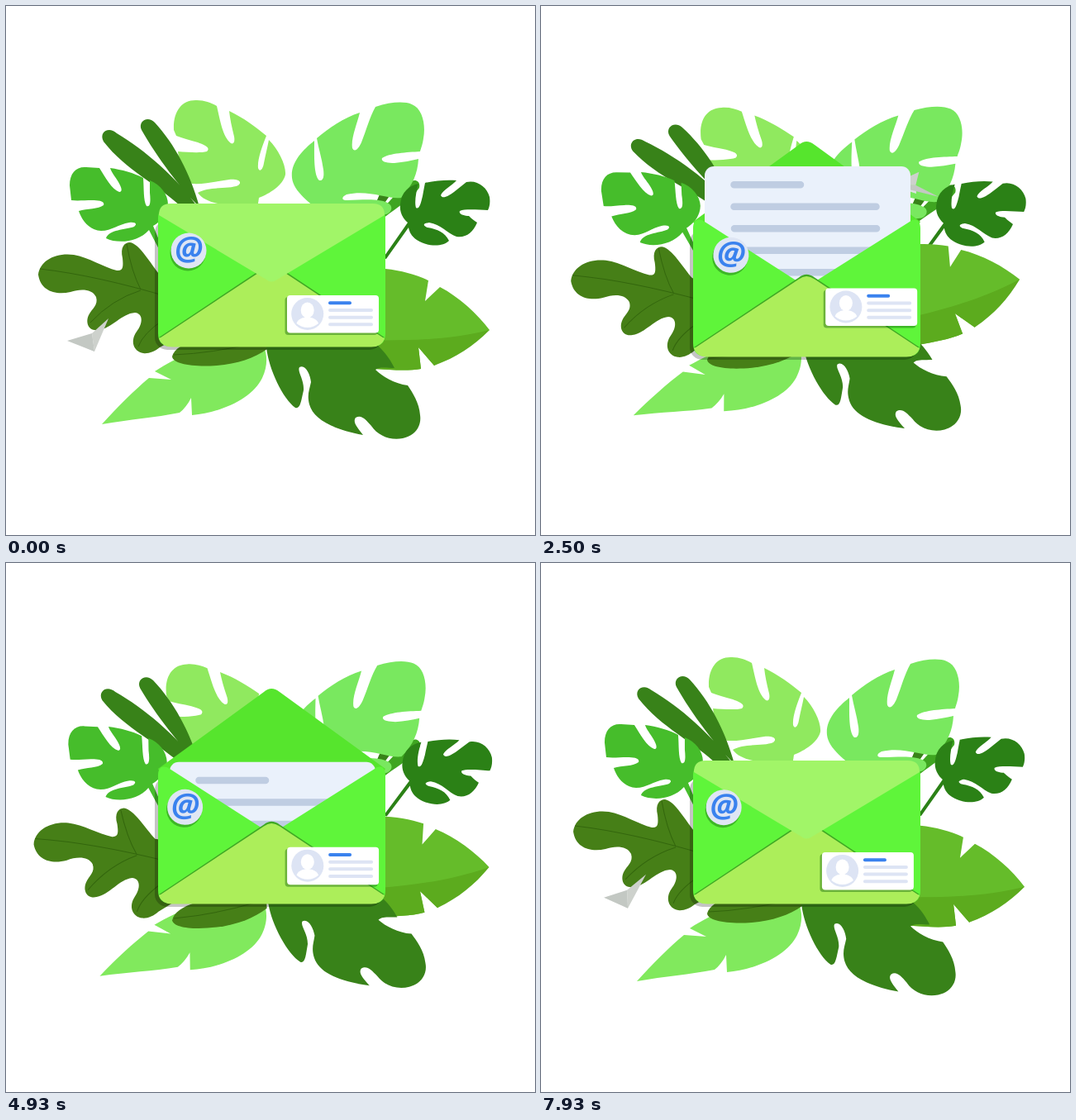
These frames come from a looping animation (640x640 px, 8000 ms). An HTML page:

```html
<!DOCTYPE html>
<html lang="en">
<head>
<meta charset="utf-8">
<title>Mail</title>
<style>
html, body { margin: 0; height: 100%; overflow: hidden; background: #fff; }
svg { display: block; width: 100vw; height: 100vh; }
.vein { fill: none; stroke: #33660d; stroke-width: 1; }
.line { fill: none; stroke-linecap: round; }
.at { font: italic 700 39px "Open Sans", "Noto Sans", sans-serif; fill: #3a82ee; text-anchor: middle; }
</style>
</head>
<body>
<svg viewBox="0 0 640 640">
  <!-- data-p: pivot, data-a: angle at each key time -->
  <g class="leaf" data-p="331 258" data-a="0 2.3 1.2 0 2 2">
    <path fill="#388219" d="M480 199C481 193 475 191 470 197C458 212 448 235 442 255L450 250C462 232 476 215 480 199Z"/>
    <path fill="#3fa521" d="M500 220C502 211 494 208 487 214C470 228 455 245 440 265L450 262C470 245 490 235 500 220Z"/>
    <path fill="#79e85f" d="M346 208C344 190 358 175 373 163C373 180 372 205 379 211C384 212 385 206 384 198C382 184 378 172 376 160C390 148 409 135 428 129C425 142 417 160 419 172C422 178 427 172 430 165C436 150 440 134 447 122C465 116 482 115 491 119C504 124 508 144 505 160C504 168 502 172 501 176C485 177 464 178 455 184C453 189 462 190 470 190C481 189 490 187 499 185C498 203 492 217 478 232C460 234 440 222 412 228C406 231 405 235 413 235C430 235 452 232 463 239C469 243 466 250 460 252L400 262C372 243 348 226 346 208Z"/>
  </g>
  <g class="leaf" data-p="325 261" data-a="0 -7.6 -1.6 -1.6 -7.6 -5">
    <path fill="#90e95f" d="M203 150C202 127 213 113 231 114C240 114 248 117 255 121C259 138 262 158 272 166C276 168 277 163 276 158C273 146 271 136 270 127C287 135 303 147 315 157C310 170 304 185 305 196C307 202 311 197 312 190C314 180 316 172 318 162C330 174 339 193 338 204C335 217 319 227 306 232L304 246H296L297 240C270 243 242 240 232 226C245 218 270 222 281 217C287 212 279 209 270 210C255 212 240 216 225 215C214 203 210 192 208 176C220 177 236 178 243 176C248 171 240 168 232 165C222 162 213 160 206 157Z"/>
  </g>
  <g class="leaf" data-p="238 245" data-a="0 -6.2 -3.2 0 -3 -6">
    <path fill="#388219" d="M118 164C112 153 124 145 134 154C168 174 207 208 234 246L214 245C186 217 145 199 118 164ZM164 150C159 139 172 132 180 141C204 167 223 203 234 243C212 222 182 182 164 150Z"/>
  </g>
  <g class="leaf" data-p="235 312" data-a="0 -3.4 -1.1 0 -2.3 -3.4">
    <path fill="#46bd2b" d="M77 217C77 202 85 194 97 195L113 196C120 207 128 222 137 225C142 225 139 218 136 213C132 206 128 202 126 196C140 198 155 202 166 208C167 220 166 236 170 242C175 244 175 235 174 226V211C187 216 196 228 196 240C195 254 185 262 178 266L192 300H188L173 271C160 286 135 288 121 281C125 270 144 271 155 267C160 263 155 261 149 262C136 264 128 272 115 272C101 271 92 260 88 248C98 245 112 246 118 241C120 236 112 235 104 235C95 235 86 236 79 235Z"/>
  </g>
  <g class="leaf" data-p="372 450" data-a="0 -2.5 0 -1.4 -3.4 -1.4">
    <path fill="#467f17" d="M39 325C41 308 60 298 82 301C100 304 118 316 134 320C142 321 142 315 141 305C138 292 143 286 150 286C162 288 175 312 186 325L210 330V400L186 413C180 418 172 421 166 420C154 418 150 405 158 394C166 384 166 372 156 371C140 372 128 390 112 392C99 394 96 382 100 374C104 366 112 362 109 352C104 342 90 342 78 346C60 350 42 345 39 325Z"/>
    <path class="vein" d="M41 318Q110 326 200 353M146 288Q152 322 163 343M102 383Q128 355 163 344M160 412Q166 396 190 380"/>
  </g>
  <g class="leaf" data-p="310 424" data-a="0 4.2 1.4 .2 3.6 3.3">
    <path fill="#81e95d" d="M116 506C135 485 155 465 173 450L200 452L180 442C195 432 210 425 230 415L312 412C316 422 317 435 310 450C298 475 260 492 225 495L224 474C220 482 215 488 210 492C180 498 150 500 116 506Z"/>
  </g>
  <g class="leaf" data-p="372 425" data-a="0 -2.6 0 -1.5 -3.45 -1.5">
    <path fill="#467f17" d="M201 424C203 415 215 408 230 404H316V415C300 426 280 433 255 435C225 437 202 433 201 424Z"/>
    <path class="vein" d="M203 422Q250 420 300 408"/>
  </g>
  <g class="leaf" data-p="440 330" data-a="0 2.9 -1.3 1.5 1 -2.4">
    <path fill="#2b8116" d="M477 240C478 225 488 217 499 215C496 225 494 238 496 244C500 247 502 238 504 230C505 224 506 219 507 214C520 211 534 210 545 211C540 217 528 223 526 229C528 234 535 230 542 225C547 221 552 217 557 213C570 210 582 219 585 231C586 238 585 243 583 247C573 247 556 245 549 248C547 252 555 254 560 254C564 258 567 260 570 262C565 274 556 281 545 279C534 275 526 264 512 262C504 263 504 266 510 268C522 270 531 274 536 284C528 292 509 291 497 283C490 278 488 273 487 268L460 306L456 305L486 262C479 256 476 248 477 240Z"/>
  </g>
  <g class="leaf" data-p="335 385" data-a="0 -17 -8.2 -.5 -12 -15">
    <path fill="#65bc2a" d="M400 318H459C478 320 496 325 511 332L507 357L525 340C548 352 570 372 585 392L518 435L499 413L502 439C485 442 465 440 446 439L400 420Z"/>
    <path fill="#5cab1e" d="M400 404C459 404 520 408 585 392C565 412 545 425 518 435L499 413L502 439C485 442 465 440 446 439L400 420Z"/>
  </g>
  <g class="leaf" data-p="293 370" data-a="0 -2.9 -3.6 -6.8 0 -7.4">
    <path fill="#388219" d="M315 413C318 440 335 475 350 486C356 488 357 478 360 465C361 452 352 442 355 437C362 433 368 445 369 455C367 465 364 470 367 482C372 500 395 512 432 519C425 510 419 503 423 498C430 494 435 500 442 508C450 520 465 526 480 523C495 520 503 508 501 495C500 480 492 468 486 459C470 457 455 448 447 440C452 436 460 438 470 438C466 430 460 420 450 411L440 390H315Z"/>
  </g>

  <g id="plane">
    <path fill="#dfe2e4"/><path fill="#c3c8c3"/><path fill="#cdd1cc"/>
  </g>

  <g id="envelope">
    <rect x="180" y="259" width="275" height="157" rx="15" opacity=".23"/>
    <path id="openFlap" fill="#56e52d" d="M184 249L312 156Q321 148 331 156L459 249L452 262H191Z"/>
    <path fill="#4fda28" d="M186 248H457L321 340Z"/>
    <g id="letter">
      <rect x="198" y="182" width="249" height="150" rx="11" fill="#eaf1fb"/>
      <path class="line" stroke="#bfcde2" stroke-width="8.5" d="M233.500 204.300H314M233.500 230.700H405.500M234 257.200H406M234 283.700H406M234 310.200H406"/>
    </g>
    <path fill="#5ff53a" d="M184 396V257C184 247 190 244 198 249L321 328L446 249C453 244 459 247 459 257V396Q459 412 443 412H200Q184 412 184 396Z"/>
    <path fill="#3fa824" d="M185 401L312 316.500Q321 309 331 316.500L458 401Z"/>
    <path fill="#acee5a" d="M185 402.500L312 318.500Q321 311.500 331 318.500L458 402.500Q454 412.500 442 412.500H201Q189 412.500 185 402.500Z"/>
    <path id="shutFlap" fill="#a1f568" d="M185 253Q185 239 199 239H444Q458 239 458 253L328 331Q321 336 315 331Z"/>
  </g>

  <g id="card">
    <rect x="-2.500" y="2" width="112" height="46" rx="4" fill="#0c5a08" opacity=".4"/>
    <rect width="111" height="45.500" rx="4" fill="#fff"/>
    <circle cx="24.700" cy="22.500" r="19.500" fill="#dde4f4"/>
    <ellipse cx="24.700" cy="18" rx="8" ry="9.500" fill="#fff"/>
    <path fill="#fff" d="M11.500 34C14 24 35 24 38 34Q32 39 24.700 39T11.500 34Z"/>
    <path class="line" stroke="#3a82ee" stroke-width="4" d="M52 9.300H76"/>
    <path class="line" stroke="#dde4f4" stroke-width="4" d="M52 18H102M52 26.700H102M52 35.300H102"/>
  </g>
  <g id="stamp">
    <circle cx="-1" cy="3" r="21.500" fill="#0c5a08" opacity=".4"/>
    <circle r="21.500" fill="#dfe6f4"/>
    <text class="at" y="11.300">@</text>
  </g>
</svg>
<script>
const LOOP = 8000, HALF = 4000, STEP = LOOP / 112;
const $ = id => document.getElementById(id);
const nums = s => s.split(' ').map(Number);

// Periodic smooth curve through the values v at the times ts.
function curve(ts, v, period, t) {
  const n = ts.length;
  const val = k => v[(k + n) % n];
  const time = k => ts[(k + n) % n] + period * Math.floor(k / n);
  const slope = k => (val(k + 1) - val(k - 1)) / (time(k + 1) - time(k - 1));
  let i = n - 1;
  while (ts[i] > t) i--;
  const d = time(i + 1) - time(i), u = (t - time(i)) / d, w = 1 - u;
  return w * w * (1 + 2 * u) * val(i) + u * u * (3 - 2 * u) * val(i + 1)
    + d * u * w * (w * slope(i) - u * slope(i + 1));
}

const keys = [0, 1860, 3140, 4210, 5640, 6710];
const sway = (v, t) => curve(keys, v, LOOP, t);
const ramp = (t, a, b) => {
  const u = Math.min(1, Math.max(0, (t - a) / (b - a)));
  return (1 - Math.cos(Math.PI * u)) / 2;
};

const leaves = [...document.querySelectorAll('.leaf')].map(el => ({
  el, pivot: el.dataset.p, angles: nums(el.dataset.a)
}));

const floats = [
  { el: $('card'), x: [340, 344, 343, 336, 344.5, 340], y: [350, 344.5, 339.5, 344.5, 342, 341.5], a: [0, 0, 0, 0, 0, 0] },
  { el: $('stamp'), x: [221, 230.5, 227, 218, 218.5, 232.5], y: [296, 300, 301.5, 295.5, 295, 287.5], a: [0, 0, 10, 5, 0, 12] }
];

const flight = [0, 210, 1640, 1860, 2250, 2710, 3140, 3650, 3930];
const corners = {
  nose: ['107 141 530 553 505 350 250 120 105', '418 408 261 227 200 240 300 370 418'],
  far: ['124 125 515 512 530 385 285 138 127', '378 376 241 228 185 225 280 335 377'],
  near: ['74 73 463 477 555 400 295 95 76', '405 417 271 260 215 255 310 345 405'],
  fold: ['104 111 497 516 528 380 280 115 104', '396 401 254 229 200 240 295 345 396'],
  keel: ['98 111 501 521 530 380 280 105 98', '414 417 271 251 212 250 305 360 414']
};
for (const c in corners) corners[c] = corners[c].map(nums);
const facets = [['fold', 'keel', 'nose'], ['near', 'fold', 'nose'], ['far', 'fold', 'nose']];

const squash = (el, y, k) => {
  el.style.display = k > 0 ? '' : 'none';
  el.setAttribute('transform', `translate(0 ${y}) scale(1 ${k}) translate(0 ${-y})`);
};

function draw(t) {
  const phase = t % HALF;
  for (const { el, pivot, angles } of leaves)
    el.setAttribute('transform', `rotate(${sway(angles, t)} ${pivot})`);
  for (const { el, x, y, a } of floats)
    el.setAttribute('transform', `translate(${sway(x, t)} ${sway(y, t)}) rotate(${sway(a, t)})`);

  const at = name => corners[name].map(v => curve(flight, v, HALF, phase));
  facets.forEach((f, i) => $('plane').children[i].setAttribute('d', `M${f.map(at).join('L')}Z`));

  const dip = t < HALF ? 7 * (1 - Math.cos(2 * Math.PI * t / HALF)) : 0;
  $('envelope').setAttribute('transform', `translate(0 ${dip})`);
  const open = ramp(phase, 350, 850) - ramp(phase, 3320, 3750);
  const rise = ramp(phase, 800, 1400) - ramp(phase, 2750, 3320);
  squash($('shutFlap'), 245, 1 - 2 * open);
  squash($('openFlap'), 248, 2 * open - 1);
  $('letter').setAttribute('transform', `translate(0 ${66 * (1 - rise)})`);
}

function tick() {
  const t = performance.now() % LOOP;
  draw(Math.floor((t + 5) / STEP) * STEP % LOOP);
  requestAnimationFrame(tick);
}
tick();
</script>
</body>
</html>
```
